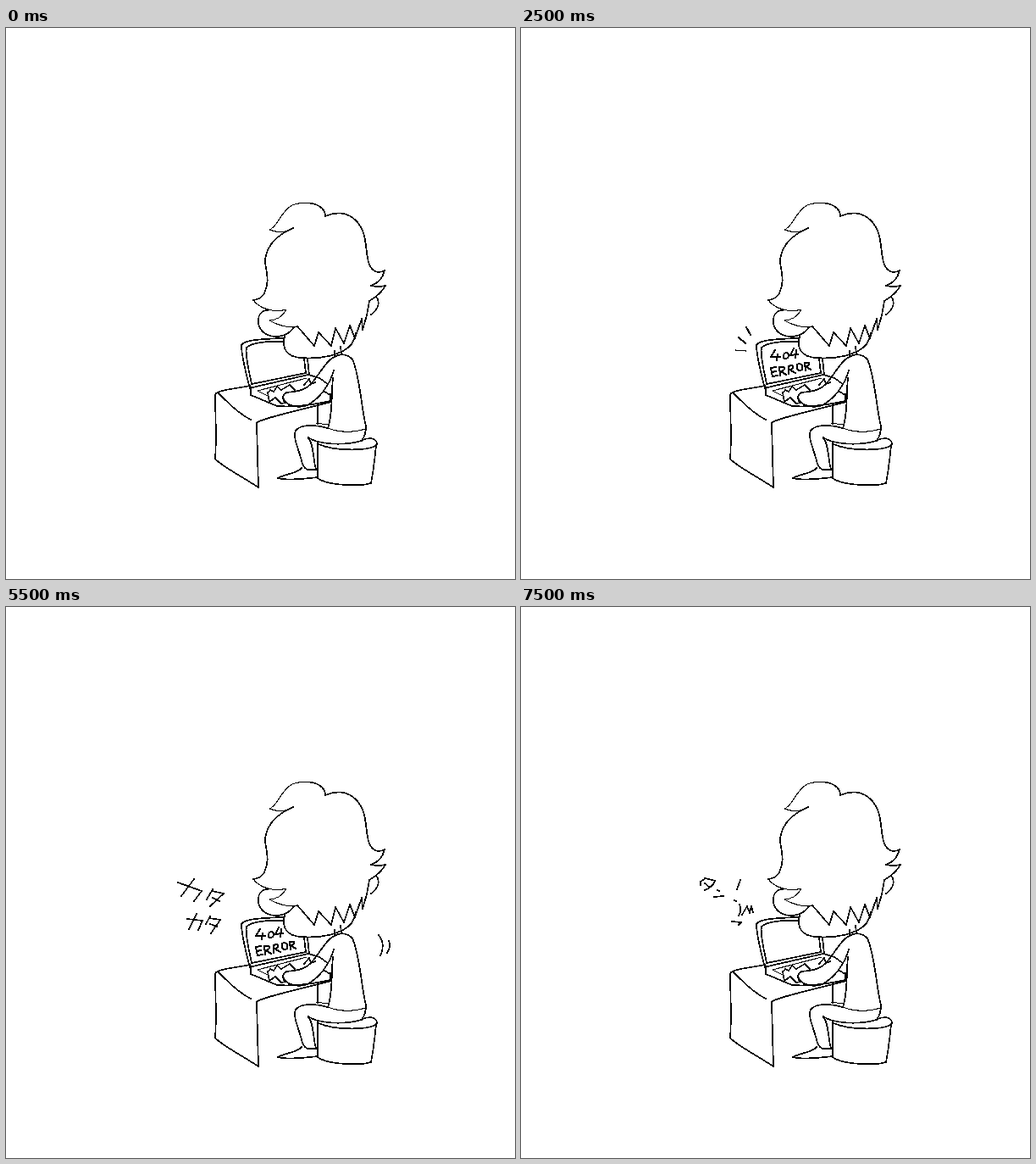
An HTML page for the animation above (8000 ms loop, 601 by 650 pixels).

```html
<!DOCTYPE html>
<html lang="ja">
<head>
<meta charset="utf-8">
<title>Typing at the desk</title>
<style>
  html, body { margin: 0; width: 100%; height: 100%; overflow: hidden; background: #fff; }
  svg { display: block; width: 601px; height: 650px; }
  path {
    fill: none; stroke: #000; stroke-width: 1.7;
    stroke-linecap: round; stroke-linejoin: round; shape-rendering: crispEdges;
  }
  .thin { stroke-width: 1.1; }
  .bold { stroke-width: 2; }
  .layer { visibility: hidden; }
</style>
</head>
<body>
<svg viewBox="0 0 601 650" role="img" aria-label="Someone typing on a laptop">
  <g>
    <!-- hair -->
    <path class="thin" d="M339 236C330 242 319 241 311 238C322 234 324 216 338 209Q344 206.500 354 206.500"/>
    <path d="M354 206.500C366 206 377 212 377 222C388 217 403 216 414 228C427 242 424 262 428 276C431 286 438 291 447 286C445 294 440 301 431 304Q440 306 448 304C443 314 435 318 429 322"/>
    <path d="M429 322L426 339L421 356L420 343L412 366L406 351L399 372L389 354L384 375L369 359L364 375L344 352"/>
    <path d="M339 236C320 244 306 258 306 276C307 288 312 298 305 313Q301 320 292 321"/>
    <path class="thin" d="M292 321C300 332 318 336 331 332C326 341 318 345 311 345C320 350 332 354 343 352"/>
    <!-- ears, face, neck -->
    <path d="M309 333C300 333 297 341 298 349C301 361 312 365 322 364Q334 362 340 353"/>
    <path d="M437 317C442 323 440 332 431 338M329 364C325 378 332 388 348 389C372 391 397 386 408 373Q412 367 413 360M395 376L396 385M388 381V387"/>
    <!-- body and arms -->
    <path d="M388 388C393 384 403 384 409 391C418 410 419 446 425 470Q425 480 420 487"/>
    <path d="M388 388C378 392 370 409 360 420C352 428 342 429 331 430M387 404C382 422 370 437 356 445C345 449 332 446 328 438"/>
    <path d="M386 413C384 432 386 455 380 472"/>
    <path class="thin" d="M380 472C395 478 412 477 424 473M366 466L380 468"/>
    <!-- legs -->
    <path d="M380 472C365 468 348 467 342 475C338 483 347 500 349 511Q351 519 356 521H366"/>
    <path d="M357 483C366 490 395 494 420 487M357 484C364 492 362 508 366 520M349 519C345 525 330 526 321 531C332 534 352 532 368 530"/>
    <!-- stool -->
    <path d="M368 490V531C380 540 418 541 431 537Q435 515 437 492M421 486C431 482 438 485 438 491C432 499 390 500 369 491"/>
    <!-- desk -->
    <path d="M288 422C270 426 247 427 247 433C247 455 249 482 247 508C250 514 280 530 298 542L296 466C297 462 330 455 384 441M250 430C262 442 275 455 289 462M368 447V467"/>
    <!-- laptop -->
    <path d="M288 425C284 410 278 385 278 374C281 368 300 367 327 366M290 420C287 405 282 385 284 377C290 371 310 369 328 370M290 420L354 407L352 390M356 390L358 409"/>
    <path d="M289 424V433L320 446Q348 448 383 440V432M291 424L357 409L370 413L380 420"/>
    <path class="thin" d="M297 428L309 434M297 428L355 413"/>
    <!-- hands -->
    <path d="M331 430Q325 434 328 440M309 430L311 441L318 436L325 443L330 442M309 431L312 427L316 429L320 423L325 427L335 421L341 427M352 421L358 414L360 420L365 418M376 429L383 433"/>
  </g>

  <g class="layer" id="error" aria-label="404 ERROR">
    <path class="bold" d="M300 380L295 388L306 388M303 385L302 392M313 383C309 384 309 390 312 390C317 390 317 383 313 383M322 378L318 386L327 385M325 380L324 389"/>
    <path class="bold" d="M301 400L295 401L297 411L303 410M296 406L301 405M306 410L305 400C313 398 313 403 307 405L313 409M316 408V399C323 396 323 402 317 403L324 407M328 396C324 397 325 405 330 404C334 403 333 396 328 396M336 404L335 395C342 393 342 398 336 399L342 403"/>
  </g>

  <g class="layer" id="rays">
    <path class="bold" d="M266 353L271 362M257 365L265 372"/>
    <path class="thin" d="M253 380L266 381"/>
  </g>

  <g class="layer" id="tapLow" aria-label="カタカタ">
    <path d="M203 325L231 335L222 347M222 321L207 341M244 333L237 345M243 335L257 338L241 353M244 343L252 347"/>
    <path d="M214 368L232 370L227 381M225 362L216 380M241 365L236 374M240 367L253 369L242 385M241 374L249 377"/>
    <path d="M440 387C446 394 446 404 442 411M452 394C454 399 453 404 450 408"/>
  </g>

  <g class="layer" id="tapHigh" aria-label="カタカタ">
    <path d="M224 291L248 309L239 319M243 294L224 307M260 312L251 323M260 314L272 318L257 328M259 320L265 323"/>
    <path d="M220 337L238 345L232 353M231 333L220 346M245 343L241 352M246 345L257 348L244 360M246 351L252 354"/>
    <path d="M441 374C448 381 450 390 448 398M456 377C459 383 458 388 456 391"/>
  </g>

  <g class="layer" id="shock" aria-label="ガーン">
    <path d="M216 220L240 217L236 236M228 208L218 238M241 208L245 213M247 208L251 213M244 245L264 250M270 258L277 263M269 287Q288 282 295 262"/>
  </g>

  <g class="layer" id="enter" aria-label="ターン!">
    <path d="M218 320L212 324V328M217 320L229 323Q226 331 217 334M217 326L222 330M232 334L234 335M228 342L239 341M259 322L255 333M252 346L254 347"/>
    <path d="M258 351Q261 358 257 364M261 363L267 353L270 361L272 353L274 360M249 371L260 372L257 375"/>
  </g>
</svg>
<script>
  const LOOP = 8000;
  // start time, visible layers
  const STEPS = [
    [0, ""], [500, "tapLow"], [1000, "tapHigh"], [1500, "tapLow"], [2000, "tapHigh"],
    [2500, "error rays"], [3500, "error shock"], [4500, "error"],
    [5500, "error tapLow"], [6000, "error tapHigh"], [6500, "error tapLow"], [7000, "error tapHigh"],
    [7500, "enter"]
  ];

  document.querySelectorAll(".layer").forEach(layer => {
    const frames = STEPS.map(([start, layers]) => ({
      offset: start / LOOP,
      easing: "step-end",
      visibility: layers.split(" ").includes(layer.id) ? "visible" : "hidden"
    }));
    frames.push({ ...frames.at(-1), offset: 1 });
    layer.animate(frames, { duration: LOOP, iterations: Infinity });
  });
</script>
</body>
</html>
```
